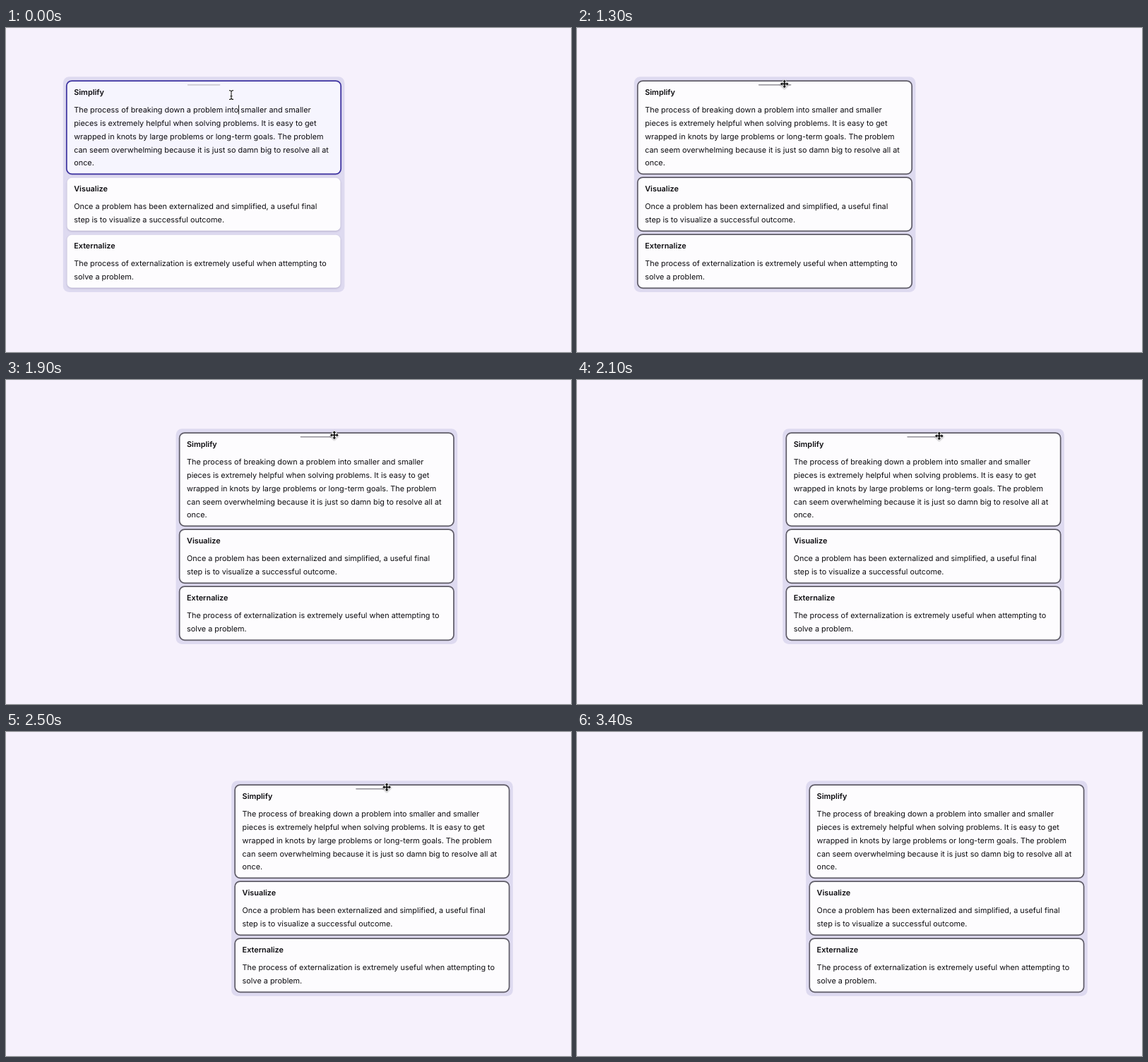
An HTML page with a canvas for the animation above (4200 ms loop, 800 by 460 pixels).

```html
<!DOCTYPE html>
<html lang="en">
<head>
<meta charset="utf-8">
<title>Dragging a stack of cards</title>
<style>
  html, body { margin: 0; width: 100%; height: 100%; overflow: hidden; background: #f6f1fc; }
  canvas { display: block; width: 800px; height: 460px; }
</style>
</head>
<body>
<canvas id="stage" width="800" height="460"></canvas>
<script>
const ctx = document.getElementById('stage').getContext('2d');
const LOOP = 4200, STEP = 100;
const FONT = 'Inter, sans-serif', SIZE = 10.87, LINE = 18.72;
const HOVER = 300, GRAB = 1000, DRAG = 1300, PEAK = 1900, DROP = 3200, LEAVE = 3400;

const cards = [
  { y: 75.75, h: 130.9, title: 'Simplify', lines: [
    'The process of breaking down a problem into smaller and smaller',
    'pieces is extremely helpful when solving problems. It is easy to get',
    'wrapped in knots by large problems or long-term goals. The problem',
    'can seem overwhelming because it is just so damn big to resolve all at',
    'once.'] },
  { y: 212.75, h: 74.9, title: 'Visualize', lines: [
    'Once a problem has been externalized and simplified, a useful final',
    'step is to visualize a successful outcome.'] },
  { y: 293.75, h: 74.9, title: 'Externalize', lines: [
    'The process of externalization is extremely useful when attempting to',
    'solve a problem.'] }
];

const ramp = (t, from, to) => Math.min(1, Math.max(0, (t - from) / (to - from)));
const mix = (a, b, k) => a + (b - a) * k;

// The stack speeds up until PEAK, then glides to rest.
function shift(t) {
  if (t < PEAK) return 159.8 * ramp(t, DRAG, PEAK) ** 1.71;
  return 243.5 - 83.7 * Math.exp((PEAK - t) / 215);
}

function pointerAt(t) {
  if (t < GRAB) {
    const k = ramp(t, 0, 400);
    return [mix(319, 295.5, k), mix(95, 72.5, k)];
  }
  // The pointer runs slightly ahead of the stack, with a dip on the way.
  const dip = Math.sin(Math.PI * ramp(t, 1400, 2000)) ** 2;
  return [
    293.5 + shift(t + 12) + 7 * ramp(t, DRAG, DRAG + 300) - 8 * ramp(t, 3000, DROP) ** 2,
    79.4 - 4.7 * dip - 4.3 * ramp(t, 2300, 3100)
  ];
}

function box(x, y, w, h, r, color) {
  ctx.fillStyle = color;
  ctx.beginPath();
  ctx.roundRect(x, y, w, h, r);
  ctx.fill();
}

function frameBox(x, y, w, h, color, alpha) {
  const d = 0.7;
  ctx.globalAlpha = alpha;
  ctx.strokeStyle = color;
  ctx.lineWidth = 1.7;
  ctx.beginPath();
  ctx.roundRect(x - d, y - d, w + 2 * d, h + 2 * d, 7.3);
  ctx.stroke();
  ctx.globalAlpha = 1;
}

function text(s, x, y, weight) {
  ctx.font = `${weight} ${SIZE}px ${FONT}`;
  ctx.fillText(s, x, y);
}

function drawCard(card, first, picked) {
  const x = 86.5, w = 387, { y, h } = card;
  ctx.save();
  ctx.shadowColor = `rgba(60, 50, 100, ${0.28 * (1 - picked)})`;
  ctx.shadowBlur = 2.5;
  ctx.shadowOffsetY = 1;
  box(x, y, w, h, 6.5, '#fdfcfe');
  ctx.restore();
  if (first && picked < 1) {
    ctx.globalAlpha = 1 - picked;
    box(x, y, w, h, 6.5, '#f6f5fe');
    frameBox(x, y, w, h, '#3c32a0', 1 - picked);
  }
  if (picked) frameBox(x, y, w, h, '#5f5c67', picked);
  ctx.fillStyle = '#0d0c10';
  text(card.title, 96.2, y + 19.55, 600);
  card.lines.forEach((s, i) => text(s, 96.2, y + 44.65 + i * LINE, 400));
}

function outlined(points, width) {
  ctx.beginPath();
  points.forEach(([x, y]) => ctx.lineTo(x, y));
  ctx.closePath();
  ctx.save();
  ctx.shadowColor = 'rgba(0, 0, 0, .35)';
  ctx.shadowBlur = 2;
  ctx.shadowOffsetY = 1;
  ctx.lineJoin = 'round';
  ctx.strokeStyle = '#fff';
  ctx.lineWidth = width;
  ctx.stroke();
  ctx.restore();
  ctx.fillStyle = '#0c0c0c';
  ctx.fill();
}

const pointers = {
  text() {
    for (const [color, width] of [['#ffffff', 2.6], ['#1a1a1a', 1.1]]) {
      ctx.strokeStyle = color;
      ctx.lineWidth = width;
      ctx.beginPath();
      for (const s of [-1, 1]) {
        ctx.moveTo(-3, 6.4 * s);
        ctx.quadraticCurveTo(0, 6.4 * s, 0, 4.4 * s);
        ctx.quadraticCurveTo(0, 6.4 * s, 3, 6.4 * s);
      }
      ctx.moveTo(0, -5);
      ctx.lineTo(0, 5);
      ctx.moveTo(-1.5, 1.8);
      ctx.lineTo(1.5, 1.8);
      ctx.stroke();
    }
  },
  move() {
    const arm = [[-0.8, -0.8], [-0.8, -3.2], [-2.5, -3.2], [0, -5.9], [2.5, -3.2], [0.8, -3.2]];
    const points = [];
    for (let q = 0; q < 4; q++) {
      const c = Math.cos(q * Math.PI / 2), s = Math.sin(q * Math.PI / 2);
      arm.forEach(([x, y]) => points.push([x * c - y * s, x * s + y * c]));
    }
    outlined(points, 1.4);
  },
  arrow() {
    outlined([[0.4, 0.4], [0.4, 11.6], [3, 9.2], [4.9, 13.4], [6.8, 12.5], [5, 8.5], [8.6, 8.5]], 1.4);
  }
};

function pointerKind(t) {
  if (t < HOVER) return 'text';
  return t < GRAB || t >= DROP ? 'arrow' : 'move';
}

function draw(t) {
  const picked = ramp(t, 600, 800);
  ctx.fillStyle = '#f6f1fc';
  ctx.fillRect(0, 0, 800, 460);

  ctx.save();
  ctx.translate(shift(t), 0);
  box(80.8, 69.3, 398.6, 305.7, 8.5, '#dedaf0');
  cards.forEach((card, i) => drawCard(card, i === 0, picked));
  ctx.globalAlpha = 1 - ramp(t, 3000, DROP);
  box(256.8, 79.9, 46.6, 1.6, 0.8, t < HOVER ? '#c7c5cd' : '#929097');
  ctx.globalAlpha = 1;
  if (t < 200) {
    ctx.fillStyle = '#222';
    ctx.fillRect(329, 109.5, 1, 13);
  }
  ctx.restore();

  if (t < LEAVE) {
    ctx.save();
    ctx.translate(...pointerAt(t));
    pointers[pointerKind(t)]();
    ctx.restore();
  }
}

ctx.textRendering = 'geometricPrecision';
const start = performance.now();
function tick() {
  const t = (performance.now() - start) % LOOP;
  draw(Math.floor(t / STEP) * STEP);
  requestAnimationFrame(tick);
}
draw(0);
requestAnimationFrame(tick);
</script>
</body>
</html>
```
